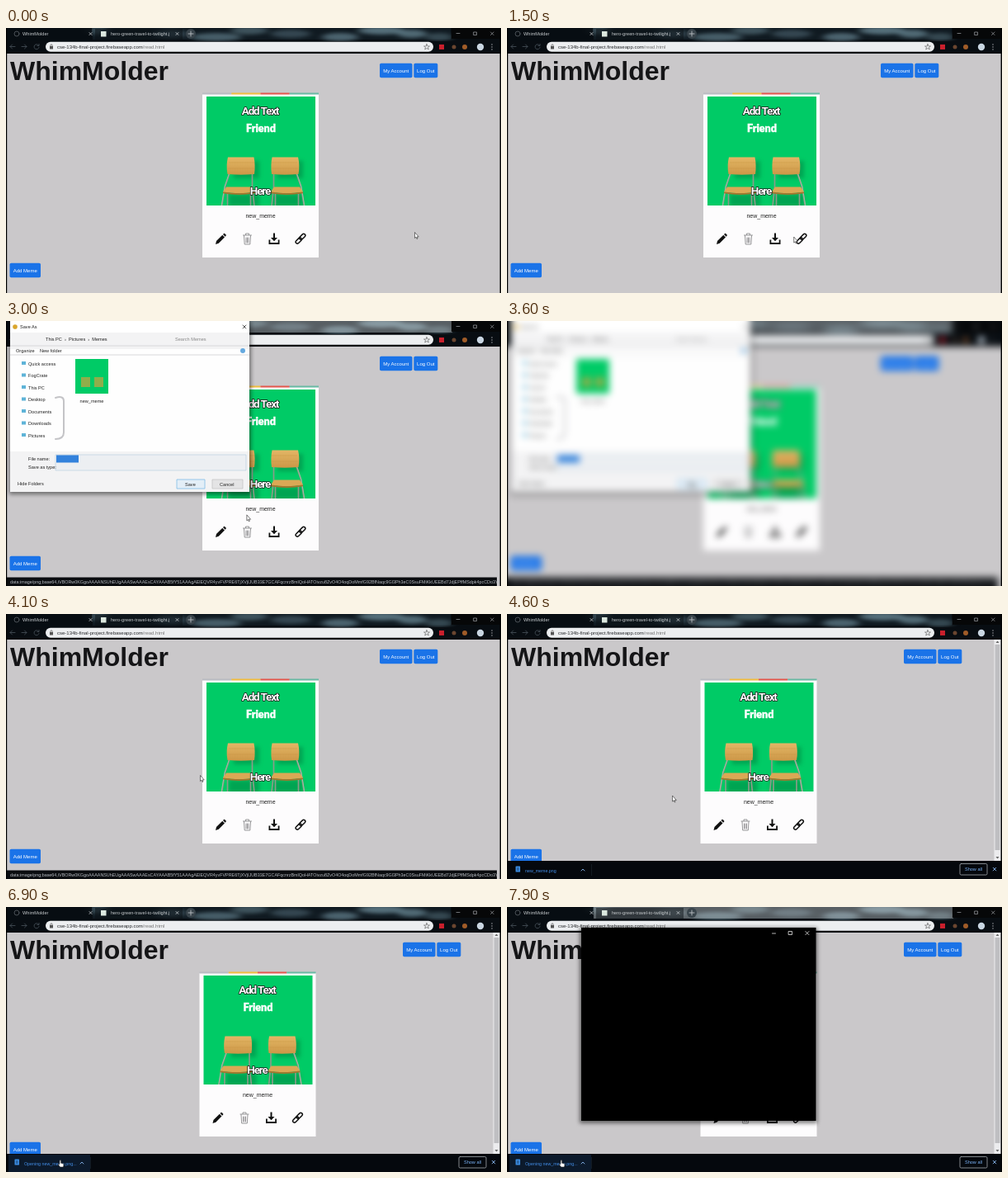
An HTML page for the animation above (8000 ms loop, 600 by 321 pixels).

```html
<!DOCTYPE html>
<html lang="en">
<head>
<meta charset="utf-8">
<title>Meme download</title>
<style>
  html, body { margin: 0; width: 100%; height: 100%; overflow: hidden; background: #000; }
  svg { display: block; width: 100vw; height: 100vh; }
  text { font-family: "Liberation Sans", Arial, sans-serif; font-size: 6px; white-space: pre; }
  .meme { font: 700 13.5px Roboto, sans-serif; letter-spacing: -1.15px; fill: #fff; stroke: #111;
          stroke-width: 1.4px; paint-order: stroke; stroke-linejoin: round; text-anchor: middle; }
  .friend { font: 900 12.6px Lato, sans-serif; fill: #fff; stroke: #fff; stroke-width: .4px; text-anchor: middle; }
  .line { fill: none; stroke-linecap: round; stroke-linejoin: round; }
  .nav text { font-size: 5.6px; fill: #222; }
</style>
</head>
<body>
<svg viewBox="0 0 600 321">
  <defs>
    <filter id="haze" filterUnits="userSpaceOnUse" x="-30" y="-30" width="660" height="381" color-interpolation-filters="sRGB">
      <feGaussianBlur id="hazeBlur" stdDeviation="0"/>
    </filter>
    <filter id="cloud" x="-50%" y="-150%" width="200%" height="400%" color-interpolation-filters="sRGB">
      <feGaussianBlur stdDeviation="5 2"/>
    </filter>
    <filter id="shade" x="-20%" y="-20%" width="140%" height="140%"><feGaussianBlur stdDeviation="2.5"/></filter>
    <clipPath id="strip"><rect x="-30" y="-30" width="660" height="46"/></clipPath>
    <clipPath id="picture"><rect x="243" y="83" width="132" height="132"/></clipPath>
    <linearGradient id="wood" x2="0" y2="1">
      <stop stop-color="#e3b665"/><stop offset="1" stop-color="#cc9747"/>
    </linearGradient>
    <g id="chair">
      <g class="line" stroke="#8a9c88" stroke-width="1.700">
        <path d="M271 176L265.500 192L261.500 216M298.500 176V192L301 216M268.500 200V216M296.500 200V216"/>
        <path d="M270.500 176L265 192L261 216" stroke="#c3cabc" stroke-width=".6"/>
      </g>
      <path d="M269 156.500H300.500Q302.500 166 301 177Q285 178.500 268.500 177Q266.500 166 269 156.500Z" fill="url(#wood)"/>
      <path d="M270 163H301M269 170H301" stroke="#c28e3d" stroke-width=".5" opacity=".7"/>
      <path d="M267 192.500H298L302 198.500Q283 202 263 198.500Z" fill="#dba855"/>
      <path d="M263 198.500Q283 202 302 198.500V200.300Q283 203.800 263 200.300Z" fill="#a8742c"/>
    </g>
  </defs>

  <g id="screen">
    <rect x="-30" y="-30" width="660" height="381" fill="#cac8ca"/>
    <text x="5" y="62.500" font-weight="700" style="font-size:32px" fill="#151517">WhimMolder</text>
    <g id="account"></g>
    <g id="addMeme"></g>

    <g id="card">
      <rect x="238" y="80" width="141" height="198" fill="#fdfcfd"/>
      <g id="stripes"></g>
      <rect x="243" y="83" width="132" height="132" fill="#00cb66"/>
      <g clip-path="url(#picture)">
        <path d="M276 161h31v21h-31zM329 161h31v21h-31zM270 201h37v16h-37zM323 201h37v16h-37z" fill="#028b45" opacity=".6" filter="url(#shade)"/>
        <use href="#chair"/>
        <use href="#chair" transform="translate(623) scale(-1 1)"/>
      </g>
      <text class="meme" x="308" y="105">Add Text</text>
      <text class="friend" x="309" y="126">Friend</text>
      <text class="meme" x="308" y="202">Here</text>
      <text x="308.500" y="230" text-anchor="middle" style="font-size:7px" fill="#222">new_meme</text>
      <path d="M254 262L255 258L262.300 250.700L265 253.400L257.800 260.800ZM263 250L264.300 248.700Q265.200 248.500 267 251L265.700 252.700Z" fill="#111"/>
      <g class="line" stroke="#8b8b8d" stroke-width=".9">
        <path d="M287.500 251H297.500M290.500 250.500V249H294.500V250.500M288.500 251.500L289.200 262H295.800L296.500 251.500M291 254V260M292.500 254V260M294 254V260"/>
      </g>
      <path d="M324 248.500H326V254H329L325 258.300L321 254H324ZM318.500 256.500H320.300V260H329.700V256.500H331.500V262H318.500Z" fill="#111"/>
      <g class="line" stroke="#111" stroke-width="1.500">
        <rect x="-4.300" y="-2" width="8.400" height="4" rx="2" transform="translate(354.800 257.500) rotate(-45)"/>
        <rect x="-4.300" y="-2" width="8.400" height="4" rx="2" transform="translate(359.300 252.800) rotate(-45)"/>
      </g>
    </g>

    <g id="scrollbar">
      <rect x="590.500" y="31" width="8" height="268" fill="#ececee"/>
      <rect x="591.500" y="37" width="6" height="249" fill="#bfbfc2"/>
      <path d="M592.500 35L594.500 32.500L596.500 35ZM592.500 294L594.500 296.500L596.500 294Z" fill="#666"/>
    </g>

    <g id="status">
      <rect id="statusBox" x="-30" y="310.500" height="40" fill="#0b0d10"/>
      <text id="statusText" x="5" y="318" style="font-size:5.400px" fill="#b9bec4"></text>
    </g>

    <g id="browser">
      <rect x="-30" y="-30" width="660" height="61" fill="#080d12"/>
      <g clip-path="url(#strip)">
        <rect x="105" y="-30" width="434" height="44" fill="#101a21"/>
        <g id="clouds" filter="url(#cloud)"></g>
        <rect id="paleStrip" x="105" y="-30" width="436" height="44" fill="#fff" opacity=".3"/>
      </g>
      <rect x="0" y="0" width="104" height="16" fill="#080d12" opacity=".85"/>
      <rect x="108" y="1" width="106" height="13" fill="#0a1015" opacity=".5"/>
      <rect x="540" y="0" width="60" height="13" fill="#060708"/>
      <circle cx="13" cy="7" r="3" class="line" stroke="#4b5157"/>
      <text x="20" y="9.200" style="font-size:5.600px" fill="#c6cacd">WhimMolder</text>
      <rect x="115" y="4" width="6.500" height="6.500" fill="#dce8df"/>
      <text x="127" y="9.200" style="font-size:5.600px" fill="#c6cacd">hero-green-travel-to-twilight.j</text>
      <circle cx="224" cy="7" r="6" fill="#39444b"/>
      <g class="line" stroke="#c8cdd1" stroke-width=".8">
        <path d="M221 7H227M224 4V10M101 5.500L104 8.500M104 5.500L101 8.500M206 5.500L209 8.500M209 5.500L206 8.500"/>
        <path d="M546 6.500H550M567 5H570.500V8.500H567ZM587.500 5L591 8.500M591 5L587.500 8.500" stroke="#8d9094"/>
        <path d="M11 22.500H5M7.500 20L5 22.500L7.500 25M19 22.500H25M22.500 20L25 22.500L22.500 25M39.500 21A3 3 0 1 0 40 23.500M40 19.500V21.500H38" stroke="#4a545c"/>
      </g>
      <rect x="48" y="16.800" width="470" height="12" rx="6" fill="#eceef0"/>
      <rect x="53" y="22" width="4" height="3.500" fill="#555"/>
      <path class="line" d="M53.900 22V20.500Q55 19 56.100 20.500V22" stroke="#555" stroke-width=".7"/>
      <text x="62" y="25.200" fill="#26282b">cse-134b-final-project.firebaseapp.com<tspan fill="#777">/read.html</tspan></text>
      <path d="M510 19.500L511 22H513.500L511.500 23.500L512.300 26L510 24.500L507.700 26L508.500 23.500L506.500 22H509Z" class="line" stroke="#555" stroke-width=".6"/>
      <rect x="525" y="20" width="6" height="6" fill="#c91f2c"/>
      <circle cx="543" cy="23" r="2.500" fill="#6b4630"/>
      <circle cx="556" cy="23" r="3" fill="#a05c28"/>
      <circle cx="575" cy="23" r="4.200" fill="#c9d6e2"/>
      <path class="line" d="M589 20V20.100M589 23V23.100M589 26V26.100" stroke="#b8bcc0" stroke-width="1.300"/>
    </g>

    <g id="shelf">
      <rect x="-30" y="299" width="660" height="52" fill="#05080d"/>
      <rect id="item" x="3" y="300" width="99" height="21" fill="#0c1a2c"/>
      <path d="M102.500 303V317" stroke="#1b232c" stroke-width=".7"/>
      <rect x="10.500" y="305.500" width="5.500" height="7" rx=".6" fill="#3b8be0"/>
      <path d="M12 308H14.500M12 310H14.500" stroke="#0a1930" stroke-width=".7"/>
      <text id="fileName" x="22" y="312.500" style="font-size:5.300px" fill="#438ee8"></text>
      <path class="line" d="M90 311L92 309L94 311M589.200 307.300L592.800 310.900M592.800 307.300L589.200 310.900" stroke="#8cbcf5" stroke-width=".9"/>
      <rect x="549" y="302.500" width="33" height="13.500" rx="1.500" class="line" stroke="#a2a7ad" stroke-width=".8"/>
      <text x="565.500" y="311.400" text-anchor="middle" style="font-size:5.600px" fill="#7ab1f5">Show all</text>
    </g>

    <g id="dialog">
      <rect x="4" y="0" width="293" height="210" fill="#000" opacity=".45" filter="url(#shade)"/>
      <rect x="5" y="-30" width="290" height="237" fill="#f3f3f4"/>
      <rect x="5" y="-30" width="290" height="44" fill="#fff"/>
      <circle cx="11" cy="7" r="2.800" fill="#d9a52c"/>
      <text x="17" y="9.300" style="font-size:5.600px" fill="#222">Save As</text>
      <path class="line" d="M287 5L291 9M291 5L287 9" stroke="#333" stroke-width=".8"/>
      <g id="working" class="nav">
        <rect x="5" y="78" width="68" height="10" fill="#cbcbcc"/>
        <text x="25" y="57">Quick access</text>
        <text x="25" y="71">FogCrate</text>
        <text x="25" y="85">This PC</text>
        <text x="25" y="99">Network</text>
        <path d="M17 66H20L22 68V73H17Z" fill="#fff" stroke="#777" stroke-width=".6"/>
        <rect x="16" y="80" width="7" height="4.500" fill="#3f9bd0"/>
        <text x="168" y="55">Working on it...</text>
        <path d="M5 187H295M5 108H295M5 136H295M73 42V187" stroke="#e4e4e5" stroke-width=".6"/>
        <path d="M10 193H57V200H10ZM206 192H236V201H206ZM250 192H290V201H250Z" fill="#fdfdfd"/>
      </g>
      <g id="loaded" class="nav">
        <rect x="5" y="34" width="290" height="124" fill="#fefefe"/>
        <path d="M5 30H295M5 41H295" stroke="#d8d8da"/>
        <text x="48" y="24">This PC  ›  Pictures  ›  Memes</text>
        <text x="205" y="24" style="fill:#888">Search Memes</text>
        <text x="12" y="38">Organize    New folder</text>
        <g id="folders"></g>
        <path class="line" d="M60 93Q70 90 70 97V135Q70 143 60 143" stroke="#c4c4c7" stroke-width="2"/>
        <rect x="84" y="46" width="40" height="42" fill="#00cb66"/>
        <path d="M91 68H102V80H91ZM107 68H118V80H107Z" fill="#8fae4b"/>
        <text x="104" y="99" text-anchor="middle">new_meme</text>
        <path d="M60 162H291V181H60Z" fill="#eceff2" stroke="#b9cfe0" stroke-width=".7"/>
        <rect x="61" y="162.500" width="27" height="9" fill="#3382dc"/>
        <text x="27" y="169">File name:</text>
        <text x="27" y="179">Save as type:</text>
        <text x="14" y="199">Hide Folders</text>
        <path d="M207 192H241V203H207Z" fill="#e3eef7" stroke="#7fbbe6" stroke-width=".8"/>
        <path d="M250 192H287V203H250Z" fill="#e4e4e5" stroke="#bbb" stroke-width=".6"/>
        <text x="217" y="199.500">Save</text>
        <text x="259" y="199.500">Cancel</text>
        <circle cx="287" cy="36" r="3" fill="#65a9df"/>
      </g>
    </g>

    <g id="viewer">
      <rect x="88" y="25" width="288" height="237" fill="#000" opacity=".5" filter="url(#shade)"/>
      <rect x="90" y="25" width="284.500" height="234" fill="#000"/>
      <path class="line" d="M321.500 32H325.500M341.500 29.500H345.500V33.500H341.500ZM361.800 29.500L366 33.700M366 29.500L361.800 33.700" stroke="#e4e4e4" stroke-width=".8"/>
    </g>

    <path id="arrow" d="M-1.500 -3.500V3.500L0 2.200L1 4.500L2 4L1.100 1.900H3.200Z" fill="#fff" stroke="#222" stroke-width=".6"/>
    <path id="hand" d="M-1 -4Q0 -5 .7 -4V-.8L3.700 0Q4.300 1 3.500 4H-.5L-2.700 .8Q-2.300 -.2 -1 .7Z" fill="#fff" stroke="#222" stroke-width=".6"/>
  </g>
  <path d="M.5 0V321M599.300 0V321" stroke="#000" stroke-width="1.400"/>
</svg>

<script>
const LOOP = 8000, STEP = 100;
const el = id => document.getElementById(id);
const show = (id, on) => el(id).setAttribute('display', on ? 'inline' : 'none');
const clamp = v => Math.max(0, Math.min(1, v));
const ease = v => v * v * (3 - 2 * v);

const button = (x, y, w, h, label) =>
  `<rect x="${x}" y="${y}" width="${w}" height="${h}" rx="1.800" fill="#1a73e8"/>
   <text x="${x + w / 2}" y="${y + h / 2 + 2.1}" text-anchor="middle" fill="#fff">${label}</text>`;
el('account').innerHTML = button(453, 42.7, 39.5, 17.5, 'My Account') + button(494.3, 42.7, 29, 17.5, 'Log Out');
el('addMeme').innerHTML = button(4.5, 284.7, 37.5, 17.5, 'Add Meme');

el('stripes').innerHTML = ['#b9bcc2', '#f2bd3f', '#e4574c', '#69b9a4'].map((color, i) =>
  `<rect x="${238 + i * 35.25}" y="78.500" width="35.250" height="2" fill="${color}"/>`).join('');

el('folders').innerHTML = ['Quick access', 'FogCrate', 'This PC', 'Desktop', 'Documents', 'Downloads', 'Pictures']
  .map((name, i) => `<rect x="19" y="${49 + i * 14.5}" width="5" height="4" fill="#5fb4d8"/>
    <text x="27" y="${53.5 + i * 14.5}">${name}</text>`).join('');

// centre, radius and brightness of each wisp in the tab strip
el('clouds').innerHTML = [[110, 14, .4], [200, 20, .4], [255, 30, .6], [295, 22, .5], [345, 24, .4], [405, 22, .65], [455, 28, .75], [492, 18, .7], [525, 16, .4]]
  .map(([x, r, a], i) => `<ellipse cx="${x}" cy="${3 + i % 3 * 4}" rx="${r}" ry="5" fill="#6c8b98" opacity="${a}"/>`).join('');

function randomLetters(count, seed) {
  const letters = 'ABCDEFGHIJKLMNOPQRSTUVWXYZabcdefghijklmnopqrstuvwxyz0123456789';
  let out = '';
  while (out.length < count) {
    seed = (seed * 16807) % 2147483647;
    out += letters[seed % letters.length];
  }
  return out;
}
const mime = 'image/png';
const link = `data:${mime};base64,iVBORw0KGgoAAAANSUhEUgAAASwAAAEsCAYAAAB5fY51`;
const longLink = link + 'AAAgAElEQVR4' + randomLetters(112, 134);

// time, x, y
const pointer = [
  [0, 497, 251], [600, 480, 254], [1800, 325, 257], [2700, 325, 257], [3500, 225, 198],
  [3900, 227, 198], [4100, 237, 199], [4500, 205, 222], [5600, 80, 289], [6300, 66, 311], [LOOP, 66, 311]
];
function pointerAt(t) {
  const i = Math.max(1, pointer.findIndex(p => p[0] > t));
  const [a, b] = [pointer[i - 1], pointer[i]];
  const k = ease(clamp((t - a[0]) / (b[0] - a[0])));
  return [a[1] + (b[1] - a[1]) * k, a[2] + (b[2] - a[2]) * k];
}

function draw(t) {
  const between = (a, b) => t >= a && t < b;
  const shelfOpen = t >= 4300, opening = t >= 6600;

  el('card').setAttribute('transform', `translate(${shelfOpen ? -3.5 : 0})`);
  el('account').setAttribute('transform', `translate(${shelfOpen ? 28 : 0})`);
  show('scrollbar', shelfOpen);
  show('shelf', shelfOpen);
  show('item', t >= 6000);
  el('fileName').textContent = opening ? 'Opening new_meme.png...' : 'new_meme.png';

  const wide = t >= 2900;
  show('status', between(1800, 4300));
  el('statusBox').setAttribute('width', wide ? 625 : 333);
  el('statusText').textContent = (wide ? longLink : link) + '...';

  const fade = clamp((t - 2400) / 230);
  show('dialog', between(2500, 3900));
  el('dialog').setAttribute('opacity', fade);
  show('working', t < 2900);
  show('loaded', t >= 2900);

  show('viewer', t >= 7400);
  show('paleStrip', between(2500, 3900) || t >= 7400);

  const [x, y] = pointerAt(t);
  const onLink = between(1700, 2800) || t >= 6100;
  for (const id of ['arrow', 'hand']) {
    el(id).setAttribute('transform', `translate(${x} ${y})`);
    show(id, (id === 'hand') === onLink);
  }

  const haze = between(3600, 3700) ? 4 : between(3700, 3800) ? 1.2 : 0;
  el('hazeBlur').setAttribute('stdDeviation', haze);
  if (haze) el('screen').setAttribute('filter', 'url(#haze)');
  else el('screen').removeAttribute('filter');
}

const start = performance.now();
function tick() {
  const t = (performance.now() - start) % LOOP;
  draw(Math.floor(t / STEP) * STEP);
  requestAnimationFrame(tick);
}
tick();
</script>
</body>
</html>
```
